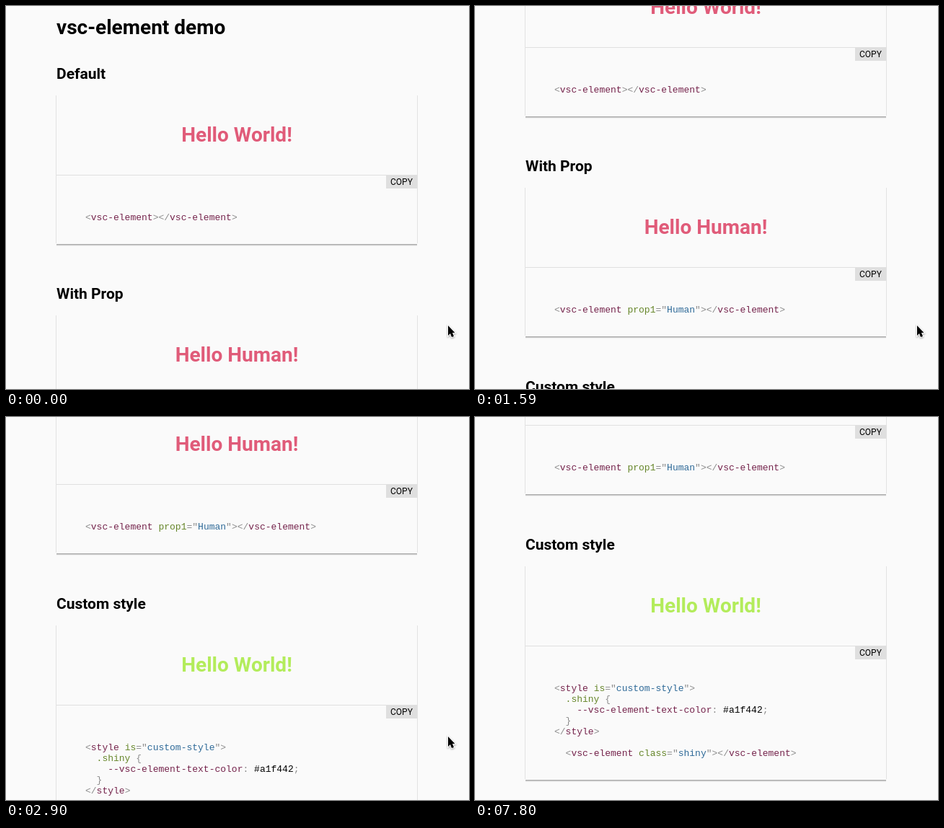
Write an HTML page that moves like this. It is 642 by 531 pixels and loops after 8 s.

```html
<!DOCTYPE html>
<html lang="en">
<head>
<meta charset="utf-8">
<title>vsc-element demo</title>
<style>
  html, body { margin: 0; width: 100%; height: 100%; overflow: hidden; background: #fafafa; }
  svg { display: block; }
  text { font-family: Roboto, sans-serif; white-space: pre; }
  .title { font-size: 28px; font-weight: 700; }
  .heading { font-size: 21px; font-weight: 700; }
  .hello { font-size: 28px; font-weight: 700; text-anchor: middle; }
  .label { font-size: 12px; }
  .code { font: 13px "Liberation Mono", monospace; }
  .punct { fill: #8c8c8c; }
  .tag { fill: #75244c; }
  .attr { fill: #66862a; }
  .value { fill: #2f6a98; }
  #arrow { filter: drop-shadow(0 1px 1px rgba(0, 0, 0, .35)); }
</style>
</head>
<body>
<svg width="642" height="531" viewBox="0 0 642 531">
  <g id="page"><text class="title" x="70" y="39">vsc-element demo</text></g>
  <g id="cursor">
    <path id="arrow" d="M1 1V15L4 12L6 17L9 16L7 11H10.5Z" stroke="#fff" stroke-width="2" paint-order="stroke"/>
    <path id="hand" fill="#fff" stroke="#000" stroke-width="1.1" stroke-linejoin="round"
      d="M-1.6 9.5V1.4Q-1.4 0 0 0T1.6 1.5V6Q3 4.7 4.4 6.4Q6 5.4 7 7.2Q9.3 6.5 9.3 9V11.5Q9 13.5 7.8 14.5V16.5H-.2Q-1 14 -3 11.8Q-5 9.2 -4.4 8Q-3.2 6.6 -1.6 9.5ZM2 11V14M4.3 11V14M6.5 11V14"/>
  </g>
</svg>
<script>
const NS = 'http://www.w3.org/2000/svg';
const LOOP = 8000;
const LINE_HEIGHT = 15;
const $ = id => document.getElementById(id);
const page = $('page');

function add(parent, name, attrs, content = '') {
  const node = document.createElementNS(NS, name);
  for (const key in attrs) node.setAttribute(key, attrs[key]);
  node.textContent = content;
  parent.append(node);
  return node;
}

const rect = (parent, x, y, width, height, fill) => add(parent, 'rect', { x, y, width, height, fill });

function addCode(parent, line, y) {
  const text = add(parent, 'text', { class: 'code', x: 110, y });
  let before = '';
  for (const token of line.match(/<\/?|>|="|["{}:;]|\s+|[^<>="{}:;\s]+/g)) {
    let kind = 'attr';
    if (/^[<>="{}:;]/.test(token)) kind = 'punct';
    else if (before[0] === '<' || token.startsWith('--')) kind = 'tag';
    else if (before === '="') kind = 'value';
    else if (token[0] === '#') kind = 'plain';
    add(text, 'tspan', { class: kind }, token);
    before = token;
  }
}

// Builds one demo card; y is the line between preview and code.
function addCard(y, heading, hello, color, lines) {
  const bottom = y + 81 + lines.length * LINE_HEIGHT;
  const card = add(page, 'g', {});
  add(card, 'text', { class: 'heading', x: 70, y: y - 133 }, heading);
  add(card, 'text', { class: 'hello', x: 320, y: y - 46, fill: color }, hello);
  for (const x of [69, 570]) rect(card, x, y - 110, 1, bottom - y + 109, '#e2e2e2');
  rect(card, 70, y, 500, 1, '#e0e0e0');
  ['#acacac', '#cacaca', '#efefef'].forEach((fill, i) => rect(card, 70, bottom + i, 500, 1, fill));
  lines.forEach((line, i) => line && addCode(card, line, y + 63 + i * LINE_HEIGHT));

  const clip = add(card, 'svg', { x: 520, y: y + 1, width: 50, height: 26 });
  const ring = add(clip, 'g', { fill: 'none', opacity: 0 });
  add(ring, 'rect', { x: 4.5, y: -4, width: 60, height: 24.5, rx: 3, stroke: '#c3dcf7', 'stroke-width': 4 });
  add(ring, 'rect', { x: 5.5, y: -4, width: 60, height: 23.5, rx: 2, stroke: '#7fb2ee', 'stroke-width': 2 });
  rect(clip, 7, 0, 43, 18, '#dfdfdf');
  const label = add(clip, 'text', { class: 'label', x: 13, y: 13 }, 'COPY');
  return { ring, label };
}

const PINK = '#e05b79';
addCard(234, 'Default', 'Hello World!', PINK, ['<vsc-element></vsc-element>']);
addCard(539, 'With Prop', 'Hello Human!', PINK, ['<vsc-element prop1="Human"></vsc-element>']);
const button = addCard(845, 'Custom style', 'Hello World!', '#b3ec5b', [
  '<style is="custom-style">',
  '  .shiny {',
  '    --vsc-element-text-color: #a1f442;',
  '  }',
  '</style>',
  '',
  '  <vsc-element class="shiny"></vsc-element>'
]);

// Progress from 0 to 1 in equal jumps, the first at `from`, the last at `to`.
function stepped(t, from, to, steps) {
  const jumps = Math.floor((t - from) / (to - from) * (steps - 1) + 0.1) + 1;
  return Math.min(1, Math.max(0, jumps / steps));
}

const easeOut = (p, power) => 1 - (1 - p) ** power;

// A short drag, a pause, then a long glide.
const flick = (t, start, drag, glide) =>
  drag * stepped(t, start, start + 260, 5) + glide * stepped(t, start + 560, start + 1310, 14);

function scrollAt(t) {
  const settle = 2 * stepped(t, 3260, 3350, 2) + (t >= 3800 ? 1 : 0);
  return Math.round(flick(t, 500, 28, 208) + flick(t, 1870, 57, 238) - settle);
}

function cursorAt(t) {
  const arrive = stepped(t, 3890, 4130, 7);
  const nudge = stepped(t, 4310, 4370, 2);
  const leave = stepped(t, 5700, 6190, 15);
  const exit = stepped(t, 7480, 7800, 12);
  return [
    612 - 71 * easeOut(arrive, 10) + 6 * leave + 20 * exit,
    442 - 110 * easeOut(arrive, 4.5) + 2 * nudge + 27 * leave + 172 * exit
  ].map(Math.round);
}

function draw(t) {
  const [x, y] = cursorAt(t);
  const overButton = x >= 527 && x < 570 && y < 337;
  page.setAttribute('transform', `translate(0 ${-scrollAt(t)})`);
  $('cursor').setAttribute('transform', `translate(${x} ${y})`);
  $('arrow').setAttribute('visibility', overButton ? 'hidden' : 'visible');
  $('hand').setAttribute('visibility', overButton ? 'visible' : 'hidden');
  button.ring.setAttribute('opacity', t < 6760 ? stepped(t, 4570, 4770, 4) : 0);
  button.label.textContent = t >= 4950 && t < 5950 ? 'DONE' : 'COPY';
}

const began = performance.now();
function tick() {
  draw((performance.now() - began) % LOOP);
  requestAnimationFrame(tick);
}
tick();
</script>
</body>
</html>
```
